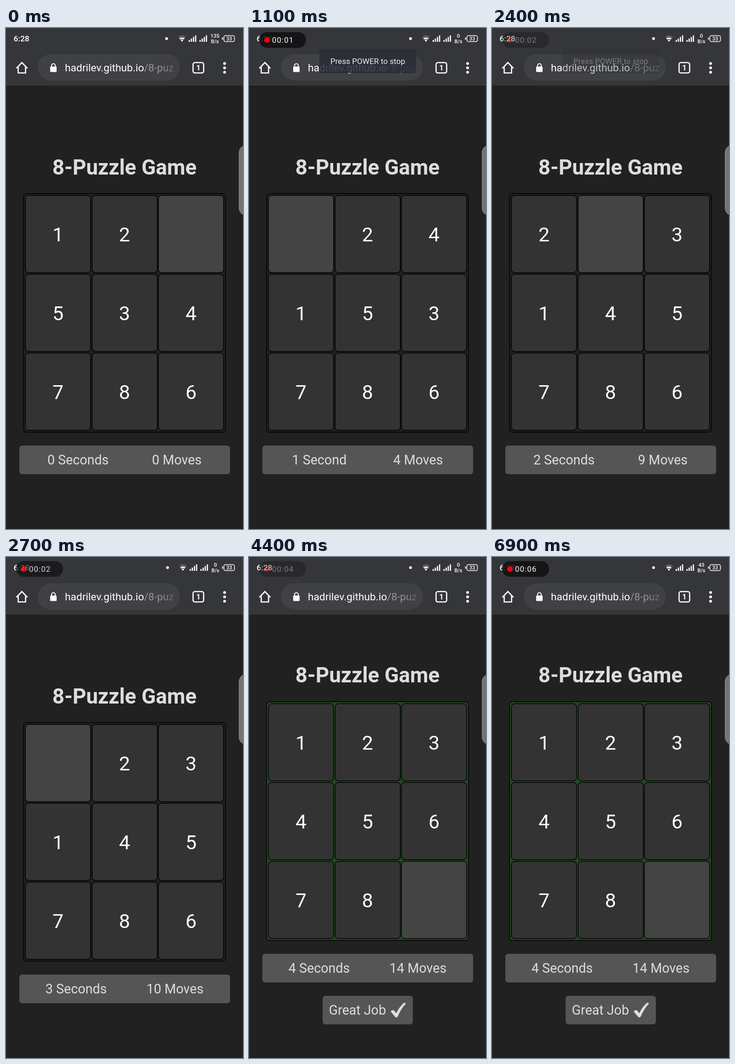
An HTML page that plays this animation: 515x1087 px, repeating every 7000 ms.

```html
<!DOCTYPE html>
<html lang="en">
<head>
<meta charset="utf-8">
<title>8-Puzzle Game</title>
<style>
  html, body { margin: 0; width: 100%; height: 100%; overflow: hidden; background: #212121; }
  body { position: relative; font-family: Roboto, "Open Sans", sans-serif; color: #fff; }
  div { position: absolute; box-sizing: border-box; white-space: pre; }
  svg { position: absolute; left: 0; top: 0; }
  #bar { left: 0; top: 0; width: 100%; height: 125px; background: #35363a; }
  #clock { left: 16.500px; top: 13px; font-size: 17.3px; line-height: 20px; font-weight: 500; }
  #field { left: 69px; top: 57px; width: 309px; height: 57px; border-radius: 29px; background: #404145; }
  #url { left: 128px; top: 67px; width: 236px; overflow: hidden; font-size: 22.7px; line-height: 39px;
    -webkit-mask: linear-gradient(90deg, #000 88%, #0006); mask: linear-gradient(90deg, #000 88%, #0006); }
  #url span { color: #94959a; }
  #pill { left: 22px; top: 9px; width: 102px; height: 34px; border-radius: 17px; background: #111012e6; }
  #pill::before { content: ""; position: absolute; left: 11px; top: 11px; width: 12px; height: 12px; border-radius: 50%; background: #f00; }
  #rec { left: 28px; top: 7px; font-size: 17px; line-height: 20px; letter-spacing: 1px; }
  #toast { left: 153px; top: 46px; width: 210px; height: 52px; border-radius: 4px; background: #2b2d37de;
    font-size: 17.1px; line-height: 52px; text-align: center; color: #eee; }
  #edge { left: 506px; top: 254px; width: 32px; height: 153px; border-radius: 16px; background: #757472; border: 1px solid #91908e; }
  #page { left: 0; top: 0; width: 515px; height: 1087px; }
  #title { left: 0; top: 274.6px; width: 515px; font-size: 45.7px; line-height: 56px; font-weight: 700; text-align: center; color: #ddd; }
  #board { left: 38px; top: 359px; width: 439px; height: 518px; border-radius: 6px; }
  #board, .tile { border: 1px solid #000; box-shadow: 0 0 0 .5px #000; }
  .tile { width: 142px; height: 168px; border-radius: 7px; background: #333;
    font-size: 42.9px; line-height: 168px; text-align: center; }
  .gap { background: #444; }
  .panel { background: #555; border-radius: 6px; color: #ddd; font-size: 28.6px; line-height: 62px; height: 62px; }
  #stats { left: 28.5px; top: 906px; width: 458px; padding: 0 14.3px; display: flex; justify-content: space-around; }
  #done { left: 159.5px; top: 952px; width: 196px; padding-left: 14px; }
</style>
</head>
<body>
<div id="bar">
  <div id="clock">6:28</div>
  <div id="field"></div>
  <div id="url">hadrilev.github.io<span>/8-puzzle</span></div>
  <svg width="515" height="125" fill="none" stroke="#fff">
    <g id="signals" stroke="none" fill="#fff">
      <circle cx="349" cy="23" r="3"/>
      <path d="M374 20Q382.500 12 391 20L382.500 30Z" fill="#606165"/>
      <path d="M377 23Q382.500 18.500 388 23L386.500 25Q382.500 21.800 378.500 25ZM380 26.500Q382.500 24.500 385 26.500L382.500 30Z"/>
      <path id="bars" d="M397 26h2.600v4h-2.600zM401.600 23h2.600v7h-2.600zM406.200 19.500h2.600v10.500h-2.600zM410.800 16h2.600v14h-2.600z"/>
      <use href="#bars" x="23.500"/>
    </g>
    <g stroke="none" fill="#fff" text-anchor="middle" font-weight="500">
      <text id="rate" y="21" font-size="11.500"></text>
      <text id="unit" y="33" font-size="11">B/s</text>
      <text x="485" y="27" font-size="11">33</text>
      <text x="418" y="92" font-size="16" font-weight="700">1</text>
    </g>
    <rect x="473.500" y="16.500" width="23" height="13" rx="3.500" stroke-width="1.500"/>
    <path d="M470.500 20.500v5" stroke-width="2"/>
    <path d="M22.500 87.500 34.500 75 46.500 87.500M26.500 84.500V97.500H42.500V84.500" stroke-width="2.600"/>
    <path d="M99 85V81.500a4 4 0 0 1 8 0V85" stroke-width="2"/>
    <rect x="96" y="83.500" width="14" height="12" rx="1.500" fill="#fff" stroke="none"/>
    <rect x="406.500" y="75" width="23" height="22.500" rx="4" stroke-width="2.600"/>
    <path d="M475 77v0M475 86.500v0M475 96v0" stroke-width="6" stroke-linecap="round"/>
  </svg>
</div>
<div id="page">
  <div id="title">8-Puzzle Game</div>
  <div id="board"></div>
  <div class="panel" id="stats"><span id="secs"></span><span id="moves"></span></div>
</div>
<div class="panel" id="done">Great Job
  <svg width="196" height="62"><path d="M148 34Q152 29 156 33L160 38Q166 25 176 16Q179 14 181 17Q170 28 163 45Q160 49 157 45Z" fill="#e2e2e2" stroke="#a8a8a8"/></svg>
</div>
<div id="edge"></div>
<div id="toast">Press POWER to stop</div>
<div id="pill"><div id="rec"></div></div>
<script>
const LOOP = 7000, STEP = 100, LIFT = 45.3;
const start = [1, 2, 0, 5, 3, 4, 7, 8, 6];
// [time, cell the gap moves to]
const slides = [[300, 5], [600, 4], [800, 3], [1000, 0], [1300, 1], [1500, 2], [1800, 5],
  [2200, 4], [2400, 1], [2600, 0], [3000, 3], [3300, 4], [3600, 5], [4400, 8]];
const ticks = [700, 1700, 2700, 3700];
const rates = [[0, 135], [400, 0], [6400, 43]];

const $ = id => document.getElementById(id);
const ramp = (t, a, b) => Math.min(1, Math.max(0, (t - a) / (b - a)));
const plural = (n, word) => n + " " + word + (n === 1 ? "" : "s");

const tiles = start.map((_, i) => {
  const el = document.createElement("div");
  el.style.left = 42 + (i % 3) * 144.5 + "px";
  el.style.top = 363 + Math.floor(i / 3) * 171 + "px";
  $("page").append(el);
  return el;
});

function draw(t) {
  const cells = start.slice();
  const past = slides.filter(s => s[0] <= t);
  let gap = cells.indexOf(0);
  for (const [, next] of past) {
    cells[gap] = cells[next];
    cells[next] = 0;
    gap = next;
  }
  tiles.forEach((el, i) => {
    el.className = cells[i] ? "tile" : "tile gap";
    el.textContent = cells[i] || "";
  });

  const won = past.length === slides.length;
  $("page").style.top = won ? -LIFT + "px" : "0";
  $("board").style.background = won ? "#204a20" : "#212121";
  $("done").style.display = won ? "block" : "none";
  $("secs").textContent = plural(ticks.filter(x => x <= t).length, "Second");
  $("moves").textContent = plural(past.length, "Move");

  const rate = rates.filter(r => r[0] <= t).pop()[1];
  const shift = rate > 99 ? 0 : 2;
  $("rate").textContent = rate;
  $("rate").setAttribute("x", 454 + shift / 2);
  $("unit").setAttribute("x", 454 + shift / 2);
  $("signals").setAttribute("transform", `translate(${shift})`);

  $("pill").style.opacity = (1 - Math.cos(Math.PI * t / 1000)) / 2;
  $("rec").textContent = "00:0" + Math.floor(t / 1000);
  $("toast").style.opacity = ramp(t, 100, 400) * (1 - ramp(t, 2200, 2500));
}

function frame() {
  const t = performance.now() % LOOP;
  draw(Math.floor(t / STEP) * STEP);
  requestAnimationFrame(frame);
}
frame();
</script>
</body>
</html>
```
